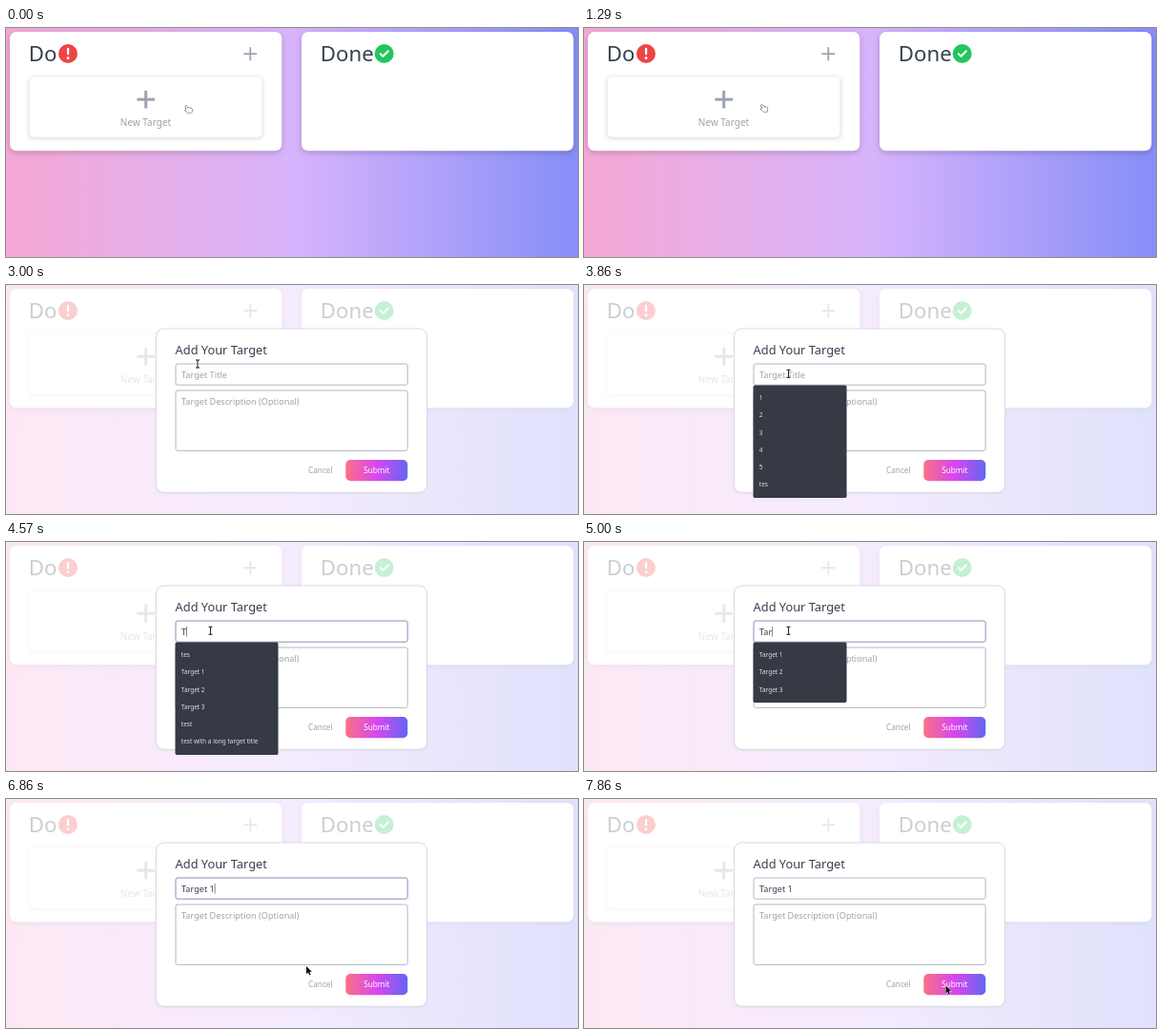
Recreate the animation shown at these times as an HTML page with a canvas. Size 600 by 241 pixels, loop 8 s.

```html
<!DOCTYPE html>
<html lang="en">
<head>
<meta charset="utf-8">
<title>Target board</title>
<style>
  html, body { margin: 0; width: 100%; height: 100%; overflow: hidden; background: #fff; }
  canvas { display: block; width: 600px; height: 241px; }
</style>
</head>
<body>
<canvas id="stage"></canvas>
<script>
const W = 600, H = 241, LOOP = 8000, TICK = 1000 / 7;
const INK = '#374151', MUTED = '#9ca3af';
const canvas = document.getElementById('stage');
const ctx = canvas.getContext('2d');
const dpr = window.devicePixelRatio || 1;
canvas.width = W * dpr;
canvas.height = H * dpr;

// Ticks at which the interface changes.
const AT = { beam: 19, modal: 21, list: 27, focus: 28, fade: 44, closed: 45, arrow: 48, blur: 52 };
const TYPED = [[31, 'T'], [33, 'Ta'], [35, 'Tar'], [37, 'Targ'], [39, 'Targe'],
  [40, 'Target'], [42, 'Target '], [44, 'Target 1']];
const LISTS = [
  [27, 97, 117.5, ['1', '2', '3', '4', '5', 'tes']],
  [32, 107, 117.5, ['tes', 'Target 1', 'Target 2', 'Target 3', 'test', 'test with a long target title']],
  [35, 97, 62.5, ['Target 1', 'Target 2', 'Target 3']]
];
// Pointer path: tick, x, y.
const PATH = [[0, 191, 85], [1, 189, 84], [3, 181, 80], [4, 178.5, 79], [5, 178, 80],
  [8, 188, 83], [11, 190, 86], [13, 191, 85], [19, 190.8, 84], [20, 190.8, 84],
  [21, 201, 83], [22, 207, 88], [23, 212, 92], [24, 214.5, 93.3], [45, 214.5, 93.3],
  [46, 225, 102], [47, 262, 128], [48, 315, 176], [49, 365, 191], [50, 400, 196],
  [51, 407, 197], [53, 392, 197], [54, 383, 196.5], [55, 379.5, 196.5]];

const latest = (rows, tick) => rows.filter(r => r[0] <= tick).pop();

function pointerAt(tick) {
  const i = PATH.findIndex(p => p[0] > tick);
  if (i < 0) return PATH[PATH.length - 1].slice(1);
  const [ta, xa, ya] = PATH[i - 1], [tb, xb, yb] = PATH[i];
  const k = (tick - ta) / (tb - ta);
  return [xa + (xb - xa) * k, ya + (yb - ya) * k];
}

function gradient(x0, x1, colors) {
  const g = ctx.createLinearGradient(x0, 0, x1, 0);
  colors.forEach((c, i) => g.addColorStop(i / (colors.length - 1), c));
  return g;
}

function box(x, y, w, h, r, fill, stroke, shadow) {
  ctx.save();
  ctx.beginPath();
  ctx.roundRect(x, y, w, h, r);
  if (shadow) {
    ctx.shadowColor = `rgba(0,0,0,${shadow[0]})`;
    ctx.shadowOffsetY = shadow[1] * dpr;
    ctx.shadowBlur = shadow[2] * dpr;
  }
  ctx.fillStyle = fill;
  ctx.fill();
  ctx.shadowColor = 'transparent';
  if (stroke) {
    ctx.strokeStyle = stroke;
    ctx.lineWidth = 1;
    ctx.stroke();
  }
  ctx.restore();
}

function text(str, x, y, size, color, align = 'left', weight = 400) {
  ctx.font = `${weight} ${size}px "Noto Sans", sans-serif`;
  ctx.textAlign = align;
  ctx.fillStyle = color;
  ctx.fillText(str, x, y);
}

function lines(points, color, width) {
  ctx.beginPath();
  points.forEach(([x, y], i) => i ? ctx.lineTo(x, y) : ctx.moveTo(x, y));
  ctx.strokeStyle = color;
  ctx.lineWidth = width;
  ctx.stroke();
}

function plus(x, y, r, width) {
  lines([[x - r, y], [x + r, y]], MUTED, width);
  lines([[x, y - r], [x, y + r]], MUTED, width);
}

function disc(x, y, r, color) {
  ctx.beginPath();
  ctx.arc(x, y, r, 0, Math.PI * 2);
  ctx.fillStyle = color;
  ctx.fill();
}

function board() {
  ctx.fillStyle = gradient(0, W, ['#f5a8d5', '#d8b4fc', '#868ef7']);
  ctx.fillRect(0, 0, W, H);
  for (const x of [4, 310]) box(x, 4, 285.3, 125.3, 7, '#fff', null, [0.2, 2, 6]);

  text('Do', 23.8, 35, 22.2, INK);
  disc(65, 27, 10, '#ef4444');
  box(64, 20.8, 2.2, 7.6, 1.1, '#fff');
  disc(65.1, 31.7, 1.4, '#fff');
  plus(256.3, 27.2, 7, 1.8);

  text('Done', 329.8, 35, 22.2, INK);
  disc(396.7, 27, 10, '#22c55e');
  ctx.lineCap = ctx.lineJoin = 'round';
  lines([[392.8, 27.2], [395.5, 29.8], [400.7, 24.4]], '#fff', 2.2);
  ctx.lineCap = 'butt';

  box(24.3, 51, 244.5, 64, 5, '#fff', '#f0f0f2', [0.18, 1, 4]);
  plus(146.7, 75.2, 9.3, 3);
  text('New Target', 146.5, 102.6, 10, MUTED, 'center');
}

function modal(tick) {
  ctx.fillStyle = 'rgba(255,255,255,0.74)';
  ctx.fillRect(0, 0, W, H);
  box(157.5, 46, 284, 172.3, 8, '#fff', '#d9dbe1', [0.06, 1, 3]);
  text('Add Your Target', 177.6, 72.8, 12.8, INK);

  const focused = tick >= AT.focus && tick < AT.blur;
  box(178, 83, 243.2, 22.2, 2, '#fff', focused ? '#8f8bb8' : '#b0b7c1');
  box(178, 111, 243.2, 63.4, 2, '#fff', '#b0bac3');
  text('Target Description (Optional)', 184, 125.6, 9.13, MUTED);

  const typed = latest(TYPED, tick);
  text(typed ? typed[1] : 'Target Title', 184, 97.5, 9.13, typed ? INK : MUTED);
  if (typed && focused) {
    const x = 184.4 + ctx.measureText(typed[1]).width;
    lines([[x, 89], [x, 99.5]], '#4b5563', 0.7);
  }

  text('Cancel', 329.8, 198.4, 8.2, MUTED, 'center');
  box(356.3, 184, 65, 22.2, 5, gradient(356, 421, ['#fb7185', '#d946ef', '#6366f1']));
  text('Submit', 388.8, 198.4, 8.2, '#fff', 'center', 500);

  if (tick >= AT.list && tick < AT.closed) suggestions(tick);
}

function suggestions(tick) {
  const [, w, h, items] = latest(LISTS, tick);
  ctx.save();
  ctx.globalAlpha = tick >= AT.fade ? 0.75 : 1;
  box(178, 106, w, h, 1, '#363a45', '#30343e');
  items.forEach((s, i) => text(s, 183.8, 121.2 + i * 18.25, 6.5, '#dfe1e5'));
  ctx.restore();
}

function shape(d, x, y, fill, stroke) {
  const p = new Path2D(d);
  ctx.save();
  ctx.translate(x, y);
  ctx.lineJoin = 'round';
  ctx.lineWidth = 1;
  ctx.strokeStyle = stroke;
  ctx.stroke(p);
  ctx.fillStyle = fill;
  ctx.fill(p);
  ctx.restore();
}

function hand(x, y) {
  shape('M-2.6-3 Q-1.8-3.6-1.2-2.6 L-.2-.8 L2.6-.8 Q4-.6 4 .8 L3.8 3.9 L-.9 3.9 L-3 1.6 Q-3.3.6-2 .6 L-1.4.8 L-2.8-2 Z',
    x, y, '#fff', '#222');
}

function beam(x, y) {
  const parts = [[[x, y - 4], [x, y + 4]], [[x - 2, y - 4], [x + 2, y - 4]], [[x - 2, y + 4], [x + 2, y + 4]]];
  parts.forEach(p => lines(p, 'rgba(255,255,255,0.7)', 2));
  parts.forEach(p => lines(p, '#26262b', 1.1));
}

function arrow(x, y) {
  shape('M0 0 L0 8.2 L1.9 6.5 L3.2 9.4 L4.6 8.8 L3.3 6 L5.8 5.8 Z', x, y, '#111', '#fff');
}

function draw(ms) {
  const tick = Math.min(55, Math.floor((ms + 4) / TICK));
  ctx.setTransform(dpr, 0, 0, dpr, 0, 0);
  board();
  if (tick >= AT.modal) modal(tick);
  const pointer = tick < AT.beam ? hand : tick < AT.arrow ? beam : arrow;
  pointer(...pointerAt(tick));
}

const start = performance.now();
function loop() {
  draw((performance.now() - start) % LOOP);
  requestAnimationFrame(loop);
}
loop();
</script>
</body>
</html>
```
